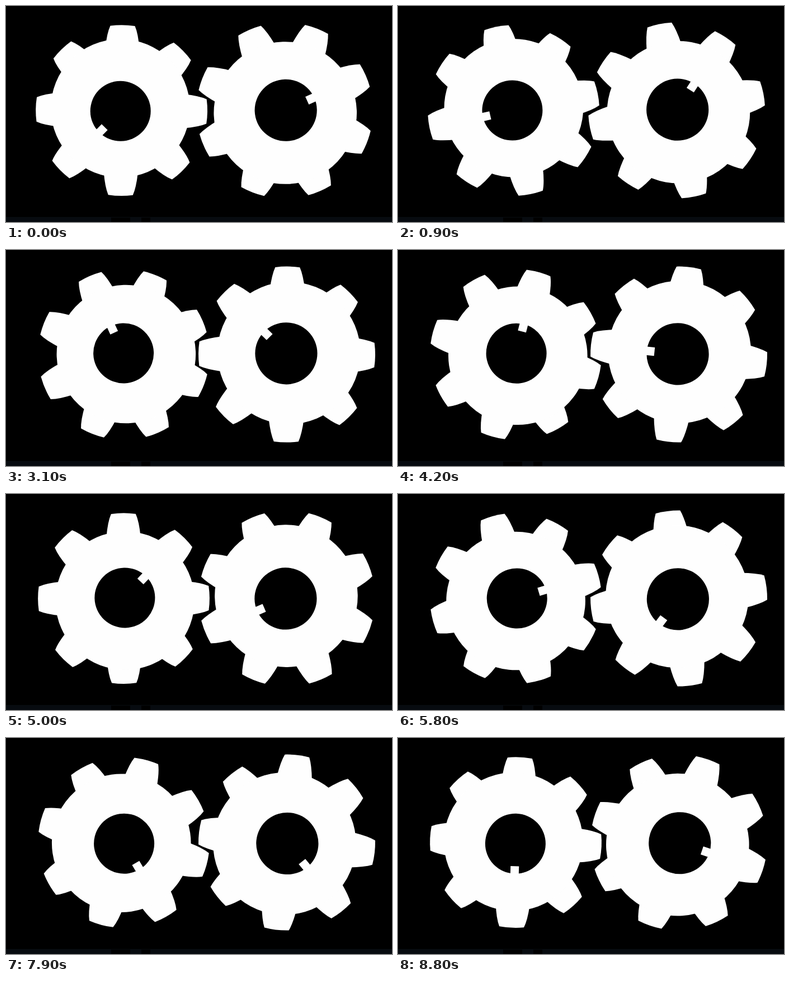
Write an HTML page that moves like this. It is 690 px wide and 388 px high and loops after 8900 ms.

```html
<!DOCTYPE html>
<html lang="en">
<head>
<meta charset="utf-8">
<title>Two gears</title>
<style>
  html, body { margin: 0; width: 100%; height: 100%; overflow: hidden; background: #000; }
  svg { display: block; width: 100vw; height: 100vh; }
</style>
</head>
<body>
<svg id="stage" viewBox="0 0 690 388">
  <rect width="690" height="388" fill="#000"/>
  <rect y="379" width="690" height="9" fill="#070b10"/>
  <path d="M188 380h34v8h-34zM242 380h16v8h-16z" fill="#000"/>
</svg>
<script>
const LOOP = 8900, STEP = 100, WHITE = '#fefefe';
const stage = document.getElementById('stage');

function add(parent, tag, attrs) {
  const el = document.createElementNS('http://www.w3.org/2000/svg', tag);
  for (const key in attrs) el.setAttribute(key, attrs[key]);
  return parent.appendChild(el);
}

// An off-centre disc, given by distance and angle from the pivot.
function disc(parent, { r, off, at }, fill) {
  const a = at * Math.PI / 180;
  const cx = off * Math.cos(a), cy = off * Math.sin(a);
  add(parent, 'circle', { cx, cy, r, fill });
  return [cx, cy];
}

// One tooth pointing along +x, with bulging flanks and a rounded tip.
function toothPath(tip, root) {
  const half = 22, x = Math.sqrt(tip * tip - half * half);
  const foot = tip - 42, bend = tip - 15;
  return `M${foot} ${-root}Q${bend} -28 ${x} ${-half}` +
    `A${tip} ${tip} 0 0 1 ${x} ${half}Q${bend} 28 ${foot} ${root}Z`;
}

function makeGear(gear) {
  const g = gear.el = add(stage, 'g', {});
  const d = toothPath(gear.tip, gear.root);
  for (let i = 0; i < 8; i++)
    add(g, 'path', { d, fill: WHITE, transform: `rotate(${gear.phase + i * 45})` });
  disc(g, gear.body, WHITE);
  const [hx, hy] = disc(g, gear.hole, '#000');
  add(g, 'rect', {
    x: hx + gear.key.from, y: hy - gear.key.width / 2,
    width: 22, height: gear.key.width, fill: WHITE
  });
  return gear;
}

const gears = [
  {
    x: 206.6, y: 187.6, start: 134.5, dir: 1, tip: 153.4, root: 30.5, phase: 1.2,
    body: { r: 124.3, off: 4.4, at: 106 },
    hole: { r: 54, off: 2.2, at: 15 },
    key: { from: 40.5, width: 15 }
  },
  {
    x: 498.1, y: 187.6, start: 335.6, dir: -1, tip: 158, root: 31.5, phase: 0.8,
    body: { r: 127.8, off: 4.6, at: 100 },
    hole: { r: 55.6, off: 2.1, at: 15 },
    key: { from: 41.8, width: 15.3 }
  }
].map(makeGear);

function smooth(a, b, t) {
  const u = Math.min(1, Math.max(0, (t - a) / (b - a)));
  return u * u * (3 - 2 * u);
}

function draw(ms) {
  const t = Math.floor(ms % LOOP / STEP) * STEP / 1000;
  // Steady turn with a slight lag midway, plus a small sideways shift.
  const lag = 1.65 * Math.exp(-(((t - 4.2) / 1.5) ** 2));
  const turn = 36 * t + 0.3 * smooth(0, 1, t) - lag;
  const shift = 3.9 * smooth(2.1, 2.8, t);
  for (const { el, x, y, start, dir } of gears)
    el.setAttribute('transform', `translate(${x + shift} ${y}) rotate(${start + dir * turn})`);
}

const begin = performance.now();
function tick() {
  draw(performance.now() - begin);
  requestAnimationFrame(tick);
}
draw(0);
requestAnimationFrame(tick);
</script>
</body>
</html>
```
